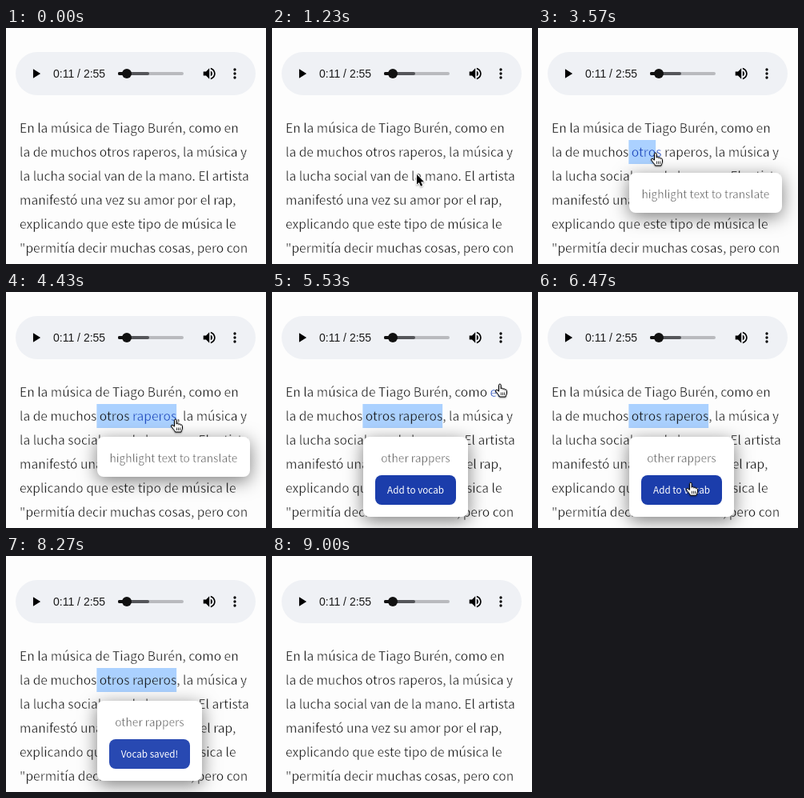
These frames come from a looping animation (325 by 295 pixels, 9160 ms). An HTML page with a canvas:

```html
<!DOCTYPE html>
<html lang="es">
<meta charset="utf-8">
<style>
  html, body { margin: 0; width: 325px; height: 295px; overflow: hidden; background: #fdfdfd }
  canvas { display: block }
</style>
<canvas id="stage" width="325" height="295"></canvas>
<script>
const ctx = document.getElementById('stage').getContext('2d');
const layer = new OffscreenCanvas(325, 295).getContext('2d');
const LOOP = 9160;
const FAMILY = '"Noto Sans CJK JP", "Noto Sans CJK SC", "Noto Sans CJK", sans-serif';
const BODY = `300 15.57px ${FAMILY}`, POPUP = `300 13.7px ${FAMILY}`, BUTTON = `400 11.7px ${FAMILY}`;
const INK = '#111', LINK = '#1540b8';
const LEFT = 17, LINE = 30, FIRST = 125;

const lines = [
  'En la música de Tiago Burén, como en',
  'la de muchos otros raperos, la música y',
  'la lucha social van de la mano. El artista',
  'manifestó una vez su amor por el rap,',
  'explicando que este tipo de música le',
  '"permitía decir muchas cosas, pero con',
];

// Pointer way points: time, x, y
const route = [
  [830, 336, 300], [1230, 181, 183], [1470, 181, 183], [2030, 104, 160],
  [2530, 104, 160], [2800, 116, 157], [3230, 116, 157], [4100, 210, 157],
  [4170, 210, 157], [4430, 213, 160], [4800, 213, 160], [5500, 286, 116],
  [5730, 286, 116], [6600, 186, 247], [6950, 186, 247], [7630, 250, 199],
  [8450, 340, 300],
];
const DRAG = 3230, DRAG_END = 4100, RELEASE = 4800, SAVED = 6900, CLOSE = 8770, FADE = 150;

const icons = {
  play: new Path2D('M8 5v14l11-7z'),
  volume: new Path2D('M3 9v6h4l5 5V4L7 9H3zm13.5 3c0-1.77-1.02-3.29-2.5-4.03v8.05c1.48-.73 2.5-2.25 2.5-4.02z' +
    'M14 3.23v2.06c2.89.86 5 3.54 5 6.71s-2.11 5.85-5 6.71v2.06c4.01-.91 7-4.49 7-8.77s-2.99-7.86-7-8.77z'),
  more: new Path2D('M14 6a2 2 0 1 1-4 0 2 2 0 0 1 4 0zm0 6a2 2 0 1 1-4 0 2 2 0 0 1 4 0zm0 6a2 2 0 1 1-4 0 2 2 0 0 1 4 0z'),
};
const arrow = new Path2D('M0 0V12.6L2.9 10 5 14.7 7.1 13.8 5.1 9.2H9Z');
const hand = new Path2D('M-2.5 8V.4C-2.5-1.4.2-1.4.2.4V5C.5 3.9 2.9 4 2.9 5.5 3.3 4.6 5.4 4.8 5.4 6.3' +
  ' 5.8 5.6 7.5 6 7.5 7.5V10C7.5 12 6.2 13 6 15H-1.5C-2 13-5.3 10-6.4 8-7.2 6.3-5.2 5.6-4 6.8Z');
const knuckles = new Path2D('M.4 9.5V13M2.5 9.5V13M4.6 9.5V13');

const clamp = v => Math.min(1, Math.max(0, v));
const ease = v => v * v * (3 - 2 * v);

function widthOf(text) {
  ctx.font = BODY;
  return ctx.measureText(text).width;
}

function label(text, x, y, font, color, align = 'left') {
  ctx.font = font;
  ctx.fillStyle = color;
  ctx.textAlign = align;
  ctx.fillText(text, x, y);
}

// Text with thinned strokes; the optional span is tinted as a link
function lightLabel(text, x, y, font, color, align = 'left', link) {
  layer.clearRect(0, 0, 325, 295);
  Object.assign(layer, { font, fillStyle: color, textAlign: align, lineWidth: .4, lineJoin: 'round' });
  layer.fillText(text, x, y);
  layer.globalCompositeOperation = 'destination-out';
  layer.strokeText(text, x, y);
  if (link) {
    layer.globalCompositeOperation = 'source-atop';
    layer.fillStyle = LINK;
    layer.fillRect(link.x, y - 21, link.end - link.x, LINE);
  }
  layer.globalCompositeOperation = 'source-over';
  ctx.drawImage(layer.canvas, 0, 0);
}

function box(x, y, w, h, r, color) {
  ctx.fillStyle = color;
  ctx.beginPath();
  ctx.roundRect(x, y, w, h, r);
  ctx.fill();
}

// Every word owns the space before it
const words = lines.flatMap((line, row) => [...line.matchAll(/\s?\p{L}+/gu)].map(m => ({
  text: m[0],
  row,
  x: LEFT + widthOf(line.slice(0, m.index)),
  end: LEFT + widthOf(line.slice(0, m.index + m[0].length)),
})));
const firstPicked = words.find(w => w.text === ' otros');
const lastPicked = words.find(w => w.text === ' raperos');

function pointerAt(t) {
  const next = route.findIndex(p => p[0] > t);
  if (next < 1) return null;
  const [t0, x0, y0] = route[next - 1], [t1, x1, y1] = route[next];
  const k = ease((t - t0) / (t1 - t0));
  return { x: x0 + (x1 - x0) * k, y: y0 + (y1 - y0) * k };
}

function popupAt(t) {
  const alpha = clamp((t - DRAG - 100) / FADE) * (1 - clamp((t - CLOSE) / FADE));
  return t < RELEASE ? { alpha, w: 191, h: 50 } : { alpha, w: 131, h: 100 };
}

const inside = (p, x, y, w, h) => p.x >= x && p.x <= x + w && p.y >= y && p.y <= y + h;

function wordUnder(p) {
  return words.find(w => p.x >= w.x && p.x < w.end && Math.abs(p.y - FIRST - w.row * LINE) < 11);
}

function icon(path, x) {
  ctx.save();
  ctx.translate(x, 47);
  ctx.scale(20 / 24, 20 / 24);
  ctx.fillStyle = '#000';
  ctx.fill(path);
  ctx.restore();
}

function drawPlayer() {
  box(12, 30, 300, 54, 27, '#eff1f5');
  icon(icons.play, 27.3);
  label('0:11 / 2:55', 59, 62, '14px "Liberation Sans", Arial, sans-serif', '#1a1a1a');
  box(140, 55, 82, 4, 2, '#b9babe');
  box(140, 55, 39, 4, 2, '#55565a');
  box(140, 55, 11, 4, 2, '#111');
  box(145, 51, 12, 12, 6, '#111');
  icon(icons.volume, 244.2);
  icon(icons.more, 276);
}

function drawSelection(t, p) {
  if (t < DRAG || t >= CLOSE) return;
  const start = firstPicked.x;
  let end = lastPicked.end;
  if (t < DRAG_END) {
    const picked = firstPicked.text + lastPicked.text;
    end = start;
    for (let n = 1; n <= picked.length; n++) {
      const edge = start + widthOf(picked.slice(0, n));
      if (edge <= p.x + 3) end = edge;
    }
  }
  ctx.fillStyle = '#abd1ff';
  ctx.fillRect(start, 140, end - start, 30);
}

function drawPopup(t, { alpha, w, h }) {
  if (!alpha) return;
  ctx.save();
  ctx.globalAlpha = alpha;
  ctx.save();
  ctx.shadowColor = 'rgba(0,0,0,.5)';
  ctx.shadowBlur = 22;
  ctx.shadowOffsetY = 5;
  box(114, 181, w, h, 8, '#fff');
  ctx.restore();
  const middle = 114 + w / 2;
  if (t < RELEASE) {
    lightLabel('highlight text to translate', middle, 212.5, POPUP, '#555', 'center');
  } else {
    const saved = t >= SAVED;
    lightLabel('other rappers', middle, 212.5, POPUP, '#555', 'center');
    box(129, 229, 101, 37, 8, saved ? '#2849b2' : '#1b3dab');
    label(saved ? 'Vocab saved!' : 'Add to vocab', middle, 252, BUTTON, '#fff', 'center');
  }
  ctx.restore();
}

function drawPointer(p, pointing) {
  const shape = pointing ? hand : arrow;
  ctx.save();
  ctx.translate(p.x, p.y);
  ctx.lineJoin = 'round';
  ctx.shadowColor = 'rgba(0,0,0,.35)';
  ctx.shadowBlur = 2;
  ctx.shadowOffsetY = 1;
  ctx.lineWidth = pointing ? 1 : 1.8;
  ctx.strokeStyle = pointing ? '#000' : '#fff';
  ctx.fillStyle = pointing ? '#fff' : '#000';
  if (pointing) ctx.fill(shape);
  ctx.stroke(shape);
  ctx.shadowColor = 'transparent';
  if (pointing) {
    ctx.lineWidth = .8;
    ctx.stroke(knuckles);
  } else {
    ctx.fill(shape);
  }
  ctx.restore();
}

function draw(t) {
  const p = pointerAt(t), popup = popupAt(t);
  const covered = p && popup.alpha && inside(p, 114, 181, popup.w, popup.h);
  const hovered = p && t > 1470 && !covered && wordUnder(p);
  const onButton = covered && t >= RELEASE && inside(p, 129, 229, 101, 37);

  ctx.fillStyle = '#fdfdfd';
  ctx.fillRect(0, 0, 325, 295);
  drawPlayer();
  drawSelection(t, p);
  lines.forEach((line, row) => {
    const link = hovered && hovered.row === row ? hovered : null;
    lightLabel(line, LEFT, FIRST + 6 + row * LINE, BODY, INK, 'left', link);
  });
  drawPopup(t, popup);
  if (p) drawPointer(p, hovered || onButton);
}

function frame() {
  draw(performance.now() % LOOP);
  requestAnimationFrame(frame);
}
frame();
</script>
</html>
```
